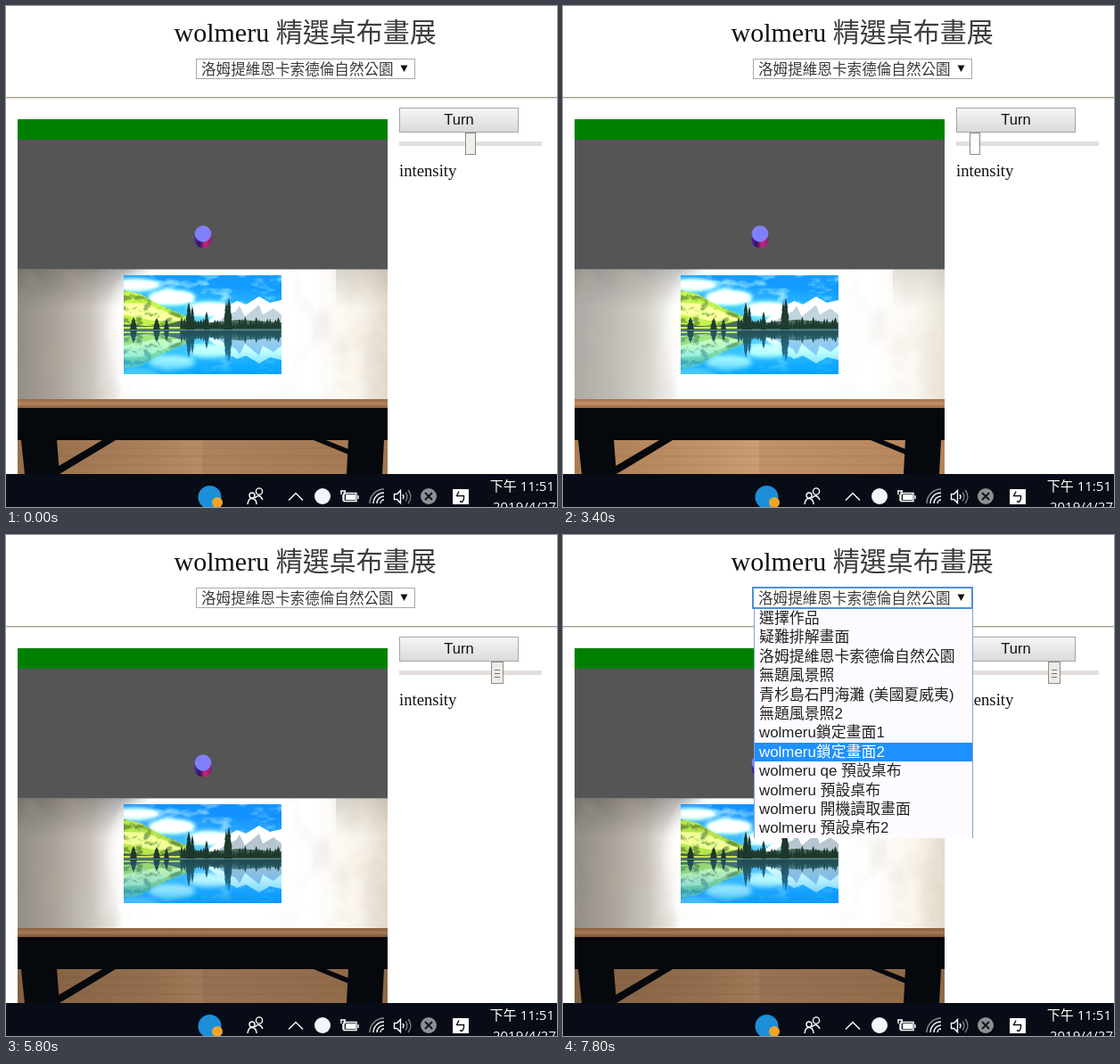
These frames come from a looping animation (618 by 562 pixels, 8 s). An HTML page:

```html
<!DOCTYPE html>
<html lang="zh-Hant">
<head>
<meta charset="utf-8">
<style>
html, body { margin: 0; width: 618px; height: 562px; overflow: hidden; background: #fff; }
svg { display: block; }
.serif { font-family: "Liberation Serif", "Noto Sans CJK TC", "Noto Sans CJK", serif; font-weight: 300; }
.sans { font-family: "Liberation Sans", "Noto Sans CJK TC", "Noto Sans CJK", sans-serif; font-weight: 300; }
.clock { font-family: "Open Sans", "Noto Sans CJK TC", "Noto Sans CJK", sans-serif; }
</style>
</head>
<body>
<svg id="stage" width="618" height="562" viewBox="0 0 618 562">
  <defs>
    <linearGradient id="wallLit">
      <stop offset="0" stop-color="#918c85"/><stop offset=".1" stop-color="#a8a29a"/>
      <stop offset=".2" stop-color="#cac5bd"/><stop offset=".28" stop-color="#fff"/>
      <stop offset=".8" stop-color="#fff"/><stop offset=".92" stop-color="#faf5ec"/>
      <stop offset="1" stop-color="#e4dccd"/>
    </linearGradient>
    <linearGradient id="topShade" x2="0" y2="1">
      <stop offset="0" stop-color="#4d4a46" stop-opacity=".45"/><stop offset=".3" stop-color="#55524e" stop-opacity="0"/>
    </linearGradient>
    <linearGradient id="wallDark" x2=".3" y2="1">
      <stop offset="0" stop-color="#333130"/><stop offset=".5" stop-color="#1d1b1a"/><stop offset="1" stop-color="#0b0a09"/>
    </linearGradient>
    <radialGradient id="spot">
      <stop offset=".84" stop-color="#fff"/><stop offset=".93" stop-color="#d8d6d2" stop-opacity=".6"/>
      <stop offset="1" stop-color="#888" stop-opacity="0"/>
    </radialGradient>
    <radialGradient id="sideSpot">
      <stop offset="0" stop-color="#e6dac4"/><stop offset=".45" stop-color="#f3ebdd"/>
      <stop offset=".68" stop-color="#e9e2d6"/><stop offset="1" stop-color="#8a857e" stop-opacity="0"/>
    </radialGradient>
    <radialGradient id="glow">
      <stop offset=".8" stop-color="#fff"/><stop offset="1" stop-color="#fff" stop-opacity="0"/>
    </radialGradient>
    <linearGradient id="floor">
      <stop offset="0" stop-color="#a97c54"/><stop offset=".4" stop-color="#c4956a"/>
      <stop offset=".5" stop-color="#cc9d73"/><stop offset=".5" stop-color="#c1916a"/><stop offset="1" stop-color="#b38359"/>
    </linearGradient>
    <linearGradient id="tableTop" x2="0" y2="1">
      <stop offset="0" stop-color="#a27146"/><stop offset=".5" stop-color="#c39367"/><stop offset="1" stop-color="#94653e"/>
    </linearGradient>
    <linearGradient id="floorDark">
      <stop offset="0" stop-opacity=".9"/><stop offset=".35" stop-opacity=".96"/>
      <stop offset=".55" stop-opacity=".84"/><stop offset="1" stop-opacity=".8"/>
    </linearGradient>
    <linearGradient id="sky" x2="-.3" y2="1">
      <stop offset="0" stop-color="#1878cc"/><stop offset=".55" stop-color="#3f9fe0"/><stop offset="1" stop-color="#b4dcf2"/>
    </linearGradient>
    <linearGradient id="lake" x2="0" y2="1">
      <stop offset="0" stop-color="#3b8cc0" stop-opacity=".15"/><stop offset=".5" stop-color="#2390d8" stop-opacity=".4"/>
      <stop offset="1" stop-color="#0a7ed0" stop-opacity=".75"/>
    </linearGradient>
    <linearGradient id="can">
      <stop offset="0" stop-color="#5a22a8"/><stop offset=".3" stop-color="#2a1560"/>
      <stop offset=".6" stop-color="#d0207c"/><stop offset="1" stop-color="#8c1d70"/>
    </linearGradient>
    <linearGradient id="face" x2="0" y2="1"><stop id="faceTop" offset="0"/><stop id="faceEnd" offset="1"/></linearGradient>
    <filter id="mottle" x="0" y="0" width="1" height="1">
      <feTurbulence type="fractalNoise" baseFrequency=".03 .025" numOctaves="3" seed="4"/>
      <feColorMatrix values="0 0 0 0 .5  0 0 0 0 .42  0 0 0 0 .32  1.6 0 0 0 -.7"/>
    </filter>
    <filter id="clouds" x="0" y="0" width="1" height="1">
      <feTurbulence type="fractalNoise" baseFrequency=".025 .06" numOctaves="4" seed="9"/>
      <feColorMatrix values="0 0 0 0 1  0 0 0 0 1  0 0 0 0 1  4 0 0 0 -2"/>
    </filter>
    <filter id="foliage" x="0" y="0" width="1" height="1" color-interpolation-filters="sRGB">
      <feTurbulence type="fractalNoise" baseFrequency=".11 .16" numOctaves="3" seed="3"/>
      <feColorMatrix values="0 0 0 0 .16  0 0 0 0 .27  0 0 0 0 .12  5 0 0 0 -2.500"/>
      <feComposite in2="SourceAlpha" operator="in"/>
    </filter>
    <filter id="soft"><feGaussianBlur stdDeviation="2.500"/></filter>
    <clipPath id="wallClip"><rect x="13" y="295" width="415" height="146"/></clipPath>
    <clipPath id="floorClip"><rect x="13" y="441" width="415" height="84"/></clipPath>
    <clipPath id="pictureClip"><rect x="132" y="302" width="177" height="111"/></clipPath>
    <clipPath id="landClip"><rect x="132" y="302" width="177" height="62"/></clipPath>
  </defs>

  <rect width="618" height="562" fill="#fff"/>
  <text class="serif" x="188.500" y="40" font-size="30" fill="#111">wolmeru <tspan fill="#3c3c3c">精選桌布畫展</tspan></text>
  <path d="M0 102.500H618" stroke="#a3a08c"/><path d="M0 103.500H618" stroke="#dcdacb"/>

  <rect x="13" y="127" width="415" height="23" fill="#008000"/>
  <rect x="13" y="150" width="415" height="145" fill="#555"/>
  <path d="M211.500 257V263A9.500 8.500 0 0 0 230.500 263V257Z" fill="url(#can)"/>
  <circle cx="221" cy="255.500" r="9.300" fill="#8080f8"/>

  <g clip-path="url(#wallClip)">
    <g id="litWall">
      <rect x="13" y="295" width="415" height="146" fill="url(#wallLit)"/>
      <rect x="13" y="295" width="150" height="146" fill="url(#topShade)"/>
      <rect x="370" y="295" width="58" height="146" fill="url(#topShade)" opacity=".4"/>
      <rect x="13" y="295" width="415" height="146" filter="url(#mottle)" opacity=".3"/>
      <rect id="wash" x="13" y="295" width="415" height="146" fill="#fff"/>
      <ellipse cx="228" cy="362" rx="120" ry="110" fill="url(#glow)"/>
    </g>
    <g id="darkWall">
      <rect x="13" y="295" width="415" height="146" fill="url(#wallDark)"/>
      <ellipse cx="392" cy="386" rx="132" ry="108" fill="url(#sideSpot)"/>
      <rect x="300" y="295" width="128" height="146" filter="url(#mottle)" opacity=".25"/>
      <ellipse cx="221" cy="357" rx="114" ry="102" fill="url(#spot)"/>
    </g>
    <path d="M13 295.500H428" stroke="#777" opacity=".5"/>
  </g>

  <g id="picture" clip-path="url(#pictureClip)">
    <g id="land" clip-path="url(#landClip)">
      <rect x="132" y="302" width="177" height="62" fill="url(#sky)"/>
      <g fill="#fff" filter="url(#soft)">
        <ellipse cx="145" cy="313" rx="26" ry="7" opacity=".8"/><ellipse cx="186" cy="327" rx="26" ry="8" opacity=".9"/>
        <ellipse cx="228" cy="340" rx="24" ry="8" opacity=".85"/>
      </g>
      <rect x="132" y="302" width="177" height="46" filter="url(#clouds)" opacity=".55"/>
      <path d="M228 352L244 340L259 331L269 335L284 326L296 333L309 330V363H228Z" fill="#e4e8ea"/>
      <path d="M236 354L258 342L262 336L268 348L284 335L288 346L300 339L309 346V360H236Z" fill="#98a5ac"/>
      <path id="hill" d="M132 319L151 323L168 333L190 343L211 352V363H132Z" fill="#9cbd4a"/>
      <path d="M132 333L157 334L184 345L200 353L165 353L132 346Z" fill="#cbdb85"/>
      <use href="#hill" filter="url(#foliage)" opacity=".5"/>
      <path d="M132 357L170 360L196 353L228 355L260 352L309 355V363H132Z" fill="#3c5344"/>
      <path d="M132 360H200L215 362H132Z" fill="#a6bb4d"/>
      <g id="trees" fill="#1a2e26"></g>
    </g>
    <g transform="translate(0 727) scale(1 -1)"><use href="#land"/></g>
    <rect x="132" y="363" width="177" height="50" fill="url(#lake)"/>
    <path d="M132 364H309" stroke="#243c38" stroke-width="2" opacity=".6"/>
  </g>

  <g clip-path="url(#floorClip)">
    <rect x="13" y="441" width="415" height="84" fill="url(#floor)"/>
    <path d="M60 496H380M50 505H390M56 515H390" stroke="#8d623f" opacity=".25"/>
    <rect x="13" y="441" width="415" height="10" fill="url(#tableTop)"/>
    <g id="floorShade">
      <rect x="13" y="441" width="415" height="10" opacity=".64"/>
      <rect x="13" y="451" width="415" height="74" fill="url(#floorDark)"/>
    </g>
    <g fill="#05080c">
      <path d="M13 451H428V487H13Z"/>
      <path d="M17 487H57L60 525H21Z"/><path d="M384 487H424L422 525H382Z"/>
      <path d="M108 487H123L60 525H54V519Z"/><path d="M345 487H359L384 497V503Z"/>
    </g>
  </g>

  <rect id="button" x="441.500" y="114.500" width="133" height="27" fill="url(#face)"/>
  <text class="sans" x="508" y="133" font-size="16.500" text-anchor="middle" fill="#111">Turn</text>
  <rect x="441" y="152" width="160" height="5" fill="#e3dedb"/>
  <g id="thumb">
    <rect id="thumbBox" y="142.500" height="24" stroke="#8f8b86"/>
    <path id="grip" d="M-3 151.500H3M-3 155.500H3M-3 159.500H3" stroke="#77736f"/>
  </g>
  <text class="serif" x="441" y="191" font-size="18.700" fill="#111">intensity</text>

  <rect id="select" fill="#fff"/>
  <text class="sans" x="219" y="77" font-size="16.600" fill="#3a3a3a">洛姆提維恩卡索德倫自然公園</text>
  <path d="M442.500 66.500H450.500L446.500 74Z" fill="#111"/>
  <g id="menu" class="sans" font-size="16.900">
    <rect x="214" y="83" width="246" height="257" fill="#fdfbff"/>
    <path d="M214.500 83V340M459.500 83V340" stroke="#86a0d0"/>
    <rect id="highlight" x="215" width="244" height="21" fill="#1e90ff"/>
  </g>

  <rect y="525" width="618" height="37" fill="#080c16"/>
  <circle cx="228.500" cy="551" r="13" fill="#1c8fd8"/>
  <circle cx="237" cy="557" r="6" fill="#f0a428"/>
  <g fill="none" stroke="#fff" stroke-width="1.400">
    <circle cx="284" cy="544.500" r="3.600"/><circle cx="276" cy="549" r="3"/>
    <path d="M279 552Q284 546 288 554M271 559Q272 552 276 552.500Q281 553 281 559"/>
    <path d="M317 554.500L325 546.500L333 554.500"/>
    <path d="M379 546.500H393V555.500H379ZM395 549V553M375 544H381M376 544V548M380 544V548M378 548V555"/>
    <path d="M408 558A16 16 0 0 1 424 542" stroke="#8a8d93"/>
    <path d="M412 558A12 12 0 0 1 424 546M416 558A8 8 0 0 1 424 550M420 558A4 4 0 0 1 424 554"/>
    <path d="M435.500 547.500H438.500L442.500 543.500V557.500L438.500 553.500H435.500ZM445 548Q447 550.500 445 553"/>
    <path d="M448 545.500Q452 550.500 448 555.500M451 543Q457 550.500 451 558" stroke="#7b7f86"/>
  </g>
  <circle cx="355" cy="550" r="9" fill="#f2f6fa"/>
  <rect x="381" y="548" width="11" height="6" fill="#fff"/>
  <circle cx="474" cy="550" r="9" fill="#8d8f92"/>
  <path d="M470 546L478 554M478 546L470 554" stroke="#11151c" stroke-width="2"/>
  <rect x="501" y="542" width="18" height="17" fill="#fff"/>
  <path d="M508 544.500L505.500 549.500H513.500Q514 555 511 556.500L509 555.500" fill="none" stroke="#111" stroke-width="1.400"/>
  <g class="clock" font-size="15" fill="#fff">
    <text x="615" y="544" text-anchor="end">下午 11:51</text>
    <text x="617" y="567" text-anchor="end">2019/4/27</text>
  </g>
</svg>
<script>
const LOOP = 8000, ROW = 21.4, MENU_TOP = 83;
const $ = id => document.getElementById(id);
const set = (id, attrs) => { for (const k in attrs) $(id).setAttribute(k, attrs[k]); };
const show = (id, on) => set(id, { visibility: on ? 'visible' : 'hidden' });

function add(parent, tag, attrs, text = '') {
  const el = document.createElementNS('http://www.w3.org/2000/svg', tag);
  for (const k in attrs) el.setAttribute(k, attrs[k]);
  el.textContent = text;
  return $(parent).appendChild(el);
}

// Value of the last step that has begun.
const stepAt = (t, steps) => steps.reduce((v, [start, next]) => t >= start ? next : v, steps[0][1]);

function addTree(x, top, base, w) {
  const h = base - top;
  add('trees', 'path', { d: `M${x} ${top}l${w * .6} ${h * .35}h${-w * .2}l${w * .5} ${h * .3}h${-w * .2}L${x + w} ${base}
    H${x - w}l${w * .3} ${-h * .35}h${-w * .2}l${w * .5} ${-h * .3}h${-w * .2}Z` });
}

[[143, 349, 4], [169, 350, 4], [180, 351, 3], [205, 332, 4], [209, 336, 3], [225, 342, 3],
 [247, 331, 3], [250, 327, 4]].forEach(([x, top, w]) => addTree(x, top, 363, w));

// Small trees along the far shore.
const noise = i => { const s = Math.sin(i * 127.1) * 43758.5; return s - Math.floor(s); };
for (let i = 0; i < 36; i++) addTree(197 + i * 3.1, 348 + noise(i) * 9, 362, 1.5 + noise(i + 50) * 1.5);

const options = ['選擇作品', '疑難排解畫面', '洛姆提維恩卡索德倫自然公園', '無題風景照',
  '青杉島石門海灘 (美國夏威夷)', '無題風景照2', 'wolmeru鎖定畫面1', 'wolmeru鎖定畫面2',
  'wolmeru qe 預設桌布', 'wolmeru 預設桌布', 'wolmeru 開機讀取畫面', 'wolmeru 預設桌布2']
  .map((label, i) => add('menu', 'text', { x: 220, y: MENU_TOP + ROW * i + 16 }, label));

const faces = {
  normal: ['#f5f5f5', '#dadada', '#a5a5a5'],
  hover: ['#fafafa', '#dfdfdf', '#8f8f8f'],
  press: ['#f0f0f0', '#dcdcdc', '#8f8f8f']
};
// Wall wash, floor shade and picture filter for each light level.
const lights = {
  lit: { wash: 0, shade: .12, filter: 'brightness(1.28) saturate(1.12)' },
  bright: { wash: .25, shade: 0, filter: 'brightness(1.28) saturate(1.12)' },
  dark: { dark: true, wash: 0, shade: 1, filter: 'none' },
  dim: { dark: true, wash: 0, shade: .97, filter: 'brightness(1.08)' },
  low: { wash: 0, shade: .25, filter: 'brightness(1.2) saturate(1.1)' }
};
const buttonSteps = [[0, 'normal'], [900, 'hover'], [1300, 'press'], [1500, 'hover'], [2200, 'press'],
  [2400, 'hover'], [2700, 'normal'], [5700, 'hover'], [5800, 'normal']];
const thumbSteps = [[0, 521], [3300, 490], [3400, 462], [4700, 486], [4800, 507], [5000, 530], [5100, 551]];
const thumbFills = [[0, '#f1efe9'], [2700, '#fdfdfd'], [5400, '#edebe7']];
const lightSteps = [[0, 'lit'], [1500, 'dark'], [2400, 'bright'], [3900, 'dim'], [5400, 'low']];
const rowSteps = [[0, 2], [7200, 0], [7300, 2], [7400, 4], [7500, 5], [7700, 6], [7800, 7]];

function render(t) {
  const light = lights[stepAt(t, lightSteps)];
  show('litWall', !light.dark);
  show('darkWall', light.dark);
  set('wash', { opacity: light.wash });
  set('floorShade', { opacity: light.shade });
  $('picture').style.filter = light.filter;

  const [top, end, edge] = faces[stepAt(t, buttonSteps)];
  set('faceTop', { 'stop-color': top });
  set('faceEnd', { 'stop-color': end });
  set('button', { stroke: edge });

  // The thumb is a little wider while it shows its grip.
  const gripped = t >= 4700, width = gripped ? 13 : 11;
  set('thumb', { transform: `translate(${stepAt(t, thumbSteps)} 0)` });
  set('thumbBox', { x: -width / 2, width, fill: stepAt(t, thumbFills) });
  show('grip', gripped);

  const open = t >= 6700, row = stepAt(t, rowSteps);
  set('select', open
    ? { x: 213, y: 59, width: 246, height: 23, stroke: '#4d8fe0', 'stroke-width': 2 }
    : { x: 213.5, y: 59.5, width: 245, height: 22, stroke: t >= 6000 ? '#8c8c8c' : '#a9a9a9', 'stroke-width': 1 });
  show('menu', open);
  set('highlight', { y: Math.round(MENU_TOP + ROW * row) });
  options.forEach((el, i) => el.setAttribute('fill', i === row ? '#fff' : '#222'));
}

function frame() {
  render(performance.now() % LOOP);
  requestAnimationFrame(frame);
}
frame();
</script>
</body>
</html>
```
